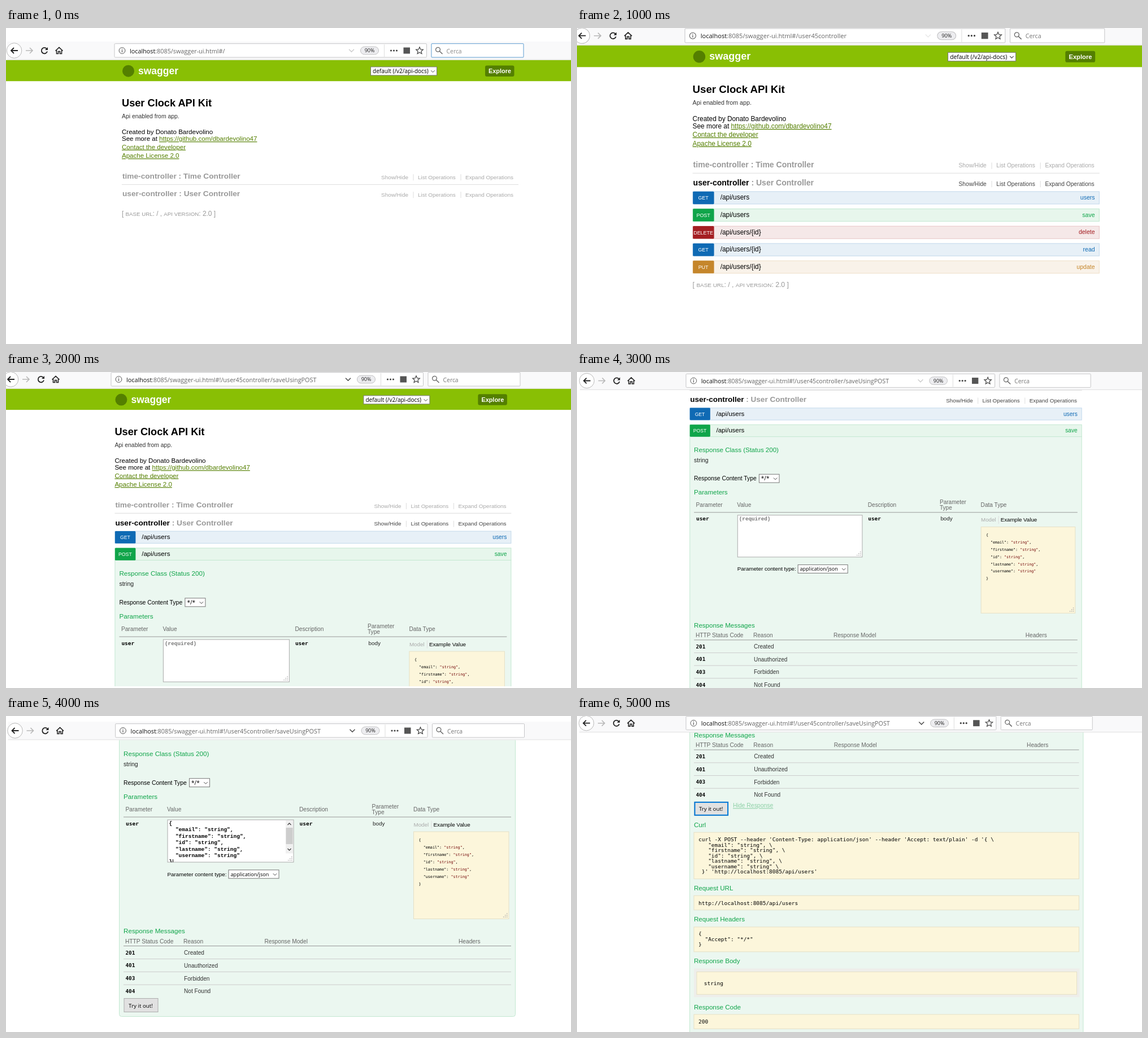
An HTML page for the animation above (6000 ms loop, 1000 px wide and 560 px high).

```html
<!DOCTYPE html>
<html lang="en">
<head>
<meta charset="utf-8">
<title>API docs walkthrough</title>
<style>
html, body { margin: 0; width: 100%; height: 100%; overflow: hidden; background: #fff; }
svg { display: block; }
text { font-family: "Liberation Sans", Arial, sans-serif; white-space: pre; }
.ui { font-family: "Open Sans", "Noto Sans", sans-serif; }
.mono { font-family: "DejaVu Sans Mono", monospace; }
.cour { font-family: "Liberation Mono", monospace; font-weight: bold; }
.b { font-weight: bold; }
.u { text-decoration: underline; }
.end { text-anchor: end; }
.mid { text-anchor: middle; }
</style>
</head>
<body>
<svg id="stage" width="100%" height="100%" viewBox="0 0 1000 560"></svg>
<script>
const GREEN = '#10a54a', GREY = '#999', PALE = '#fcf6db';

// Drawing helpers
const text = (x, y, str, size, fill = '#000', cls = '') =>
  `<text x="${x}" y="${y}" font-size="${size}" fill="${fill}" class="${cls}">${str}</text>`;
const span = (str, attrs) => `<tspan ${attrs}>${str}</tspan>`;
const rect = (x, y, w, h, fill, stroke = 'none', r = 0, sw = 1) =>
  `<rect x="${x}" y="${y}" width="${w}" height="${h}" rx="${r}" fill="${fill}" stroke="${stroke}" stroke-width="${sw}"/>`;
const path = (d, stroke, w = 1, fill = 'none') =>
  `<path d="${d}" stroke="${stroke}" stroke-width="${w}" fill="${fill}"/>`;
const circle = (x, y, r, fill, stroke = 'none', w = 1) =>
  `<circle cx="${x}" cy="${y}" r="${r}" fill="${fill}" stroke="${stroke}" stroke-width="${w}"/>`;
const hline = (y, color, x1 = 8, x2 = 694) => path(`M${x1} ${y}H${x2}`, color);
const chevron = (x, y, r, color, w = 1) => path(`M${x - r} ${y - r / 2}l${r} ${r}l${r} ${-r}`, color, w);
const lines = (x, y, step, list, size, cls, fill) =>
  list.map((s, i) => text(x, y + i * step, s, size, fill, cls)).join('');
const select = (x, y, w, label, size = 10) =>
  rect(x, y, w, 15, '#fff', '#777') + text(x + 3.5, y + 11, label, size, '#000', 'ui') +
  chevron(x + w - 7, y + 8, 3.2, '#444');
const grip = (x, y) => [[0, 0], [-3, 0], [-6, 0], [0, -3], [-3, -3], [0, -6]]
  .map(([dx, dy]) => rect(x + dx, y + dy, 1.4, 1.4, '#aaa')).join('');

const fields = ['email', 'firstname', 'id', 'lastname', 'username'];
const json = (indent, value = '"string"', tail = '') => fields.map((f, i) =>
  `${indent}"${f}": ${value}${i < 4 ? ',' : ''}${tail}`);

// Browser bar: vertical centre is 0
function toolbar({ url, arrow, focus }) {
  const star = Array.from({ length: 10 }, (_, i) => {
    const a = i * Math.PI / 5, r = i % 2 ? 3 : 6.6;
    return `${(732 + r * Math.sin(a)).toFixed(1)} ${(0.3 - r * Math.cos(a)).toFixed(1)}`;
  }).join('L');
  return rect(2, -16, 1010, 32, '#f9f9fa') + hline(16, '#e0e0e0', 2, 1012) +
    circle(14.5, 0, 13.3, '#fff', '#b8b8b8') +
    path('M21 0H9M14 -5L9 0L14 5', '#222', 1.8) +
    path('M35 0H47M42 -5L47 0L42 5', '#b8b8b8', 1.6) +
    path('M72.2 -3A5.2 5.2 0 1 0 73 1.5', '#222', 1.8) + path('M74 -6V-1H69Z', 'none', 0, '#222') +
    path('M87.5 .5L94 -5.6L100.5 .5M89.5 -.5V5.5H92.5V1.5H95.5V5.5H98.5V-.5', '#222', 1.6) +
    rect(192, -12.3, 552.5, 24.3, '#fff', '#c6c6c8', 1.5) +
    circle(205.5, 0, 5.4, 'none', '#555') + path('M205.5 -1V3M205.5 -3.2V-2', '#555', 1.2) +
    text(219, 4.5, span('localhost', 'fill="#111"') + ':8085/swagger-ui.html#' + url, 10.8, '#666', 'ui') +
    chevron(611.5, 0, 4.5, arrow, 1.4) +
    rect(627.5, -6.8, 32, 13.6, '#ededf0', '#c0c0c2', 6.8) +
    text(643.5, 3.4, '90%', 9, '#222', 'ui mid') +
    path('M669.5 -11V11', '#ddd') +
    [681.5, 686.5, 691.5].map(x => circle(x, 0, 1.6, '#444')).join('') +
    rect(703.5, -5.5, 11.5, 11, '#555') +
    path(`M${star}Z`, '#444', 1.2) +
    rect(753, -12.3, 163, 24.3, '#fff', focus ? '#5b9bd0' : '#c6c6c8', 1) +
    circle(764.5, -1.8, 3.9, 'none', '#666', 1.3) + path('M767.5 1.2L772.5 6', '#666', 1.5) +
    text(779.5, 4.5, 'Cerca', 10.4, focus ? '#888' : '#777', 'ui');
}

const section = (y, name, title, open) =>
  text(1, y, span(name, `fill="${open ? '#000' : GREY}"`) + ' : ' + title, 13.68, GREY, 'b') +
  [[459, 'Show/Hide'], [524, 'List Operations'], [608, 'Expand Operations']].map(([x, s]) =>
    text(x, y + .7, s, 9.95, open ? '#444' : '#aaa')).join('') +
  path(`M516 ${y - 8}v11M600 ${y - 8}v11`, '#ddd');

function operation(y, verb, url, note, [main, bg, edge]) {
  return rect(.5, y + .5, 701, 21.5, bg, edge) + rect(.5, y + .3, 36.5, 21.9, main, 'none', 1.5) +
    text(18.5, y + 14.7, verb, 8.7, '#fff', 'mid') + text(47.8, y + 14.7, url, 11.6) +
    text(694, y + 14.4, note, 10.3, main, 'end');
}
const blue = ['#0f6ab4', '#e7f0f7', '#c3d9ec'], green = [GREEN, '#e7f6ec', '#c3e8d1'],
  red = ['#a41e22', '#f5e8e8', '#e8c6c7'], amber = ['#c5862b', '#f9f2e9', '#f0e0ca'];
const operations = [
  ['GET', '/api/users', 'users', blue], ['POST', '/api/users', 'save', green],
  ['DELETE', '/api/users/{id}', 'delete', red], ['GET', '/api/users/{id}', 'read', blue],
  ['PUT', '/api/users/{id}', 'update', amber]
].map((op, i) => operation(252 + i * 29.9, ...op));

function footer(y) {
  const small = s => span(s, 'font-size="9.7"');
  return text(0, y, `[ ${small('BASE URL')}: / , ${small('API VERSION')}: 2.0 ]`, 11.9, GREY);
}

const intro = rect(-300, 0, 1200, 37.5, '#89bf04') +
  circle(11.5, 19.5, 10.5, '#547f00') + text(29, 25, 'swagger', 17.5, '#fff', 'b') +
  select(440.5, 12.2, 117, 'default (/v2/api-docs)') +
  rect(643, 9.7, 51.5, 19.5, '#547f00', 'none', 3) + text(649, 23.5, 'Explore', 10.9, '#fff', 'b') +
  text(0, 82, 'User Clock API Kit', 18.2, '#000', 'b') +
  text(0, 103, 'Api enabled from app.', 10.4, '#333') +
  text(0, 131, 'Created by Donato Bardevolino', 11.56) +
  text(0, 143.5, 'See more at ' + span('https://github.com/dbardevolino47', 'fill="#547f00" class="u"'), 11.56) +
  text(0, 158, 'Contact the developer', 11.56, '#547f00', 'u') +
  text(0, 173.5, 'Apache License 2.0', 11.56, '#547f00', 'u') +
  section(210.5, 'time-controller', 'Time Controller') + hline(220.7, '#ddd', 0, 702);

const label = (y, s) => text(8, y, s, 11.65, GREEN);
const heads = (y, list) => list.map(([x, s, dy = 0]) => text(x, y + dy, s, 10.2, '#666')).join('');

// Body of the opened POST row; "filled" shows the copied example in the text area
function panel(filled, bottom) {
  const area = filled
    ? `<svg x="86" y="444.5" width="223" height="75">` +
      lines(2.5, 9, 11.4, ['{', ...json('  '), '}'], 9.5, 'cour') + path('M9.5 70V75', '#000') +
      rect(209, 1, 13, 58.5, '#f0f0f0') + rect(209.5, 14, 12, 29, '#cdcdcd') +
      path('M212.5 9l3 -3l3 3', '#444', 1.3) + chevron(215.5, 52.5, 3, '#444', 1.3) + '</svg>'
    : text(88.5, 454, '(required)', 9.4, '#777', 'cour');
  const example = ['{', ...json('  ', span('"string"', 'fill="#700000"')), '}'];
  const status = [[201, 'Created'], [401, 'Unauthorized'], [403, 'Forbidden'], [404, 'Not Found']];
  return rect(.5, 300, 701, bottom - 300, '#ebf7f0', '#c3e8d1', 4) +
    label(331.5, 'Response Class (Status 200)') + text(8, 349.5, 'string', 10.5, '#222') +
    text(8, 382.5, 'Response Content Type', 10.45) + select(124.5, 371.2, 36, '*/*') +
    label(407, 'Parameters') +
    heads(429.5, [[11.5, 'Parameter'], [85, 'Value'], [319, 'Description'],
      [447.5, 'Parameter', -5], [447.5, 'Type', 5], [521, 'Data Type']]) +
    hline(439.5, GREY) +
    text(12, 454, 'user', 9.5, '#000', 'mono b') + text(319.5, 454, 'user', 9.5, '#000', 'mono b') +
    text(449, 454, 'body', 9.9, '#222') +
    rect(86, 444.5, 223, 75, '#fff', '#aaa') + area + grip(305, 515.5) +
    text(521.5, 456, 'Model', 9.8, '#aaa') + path('M553 446V460', '#ddd') + text(556.5, 456, 'Example Value', 9.8) +
    rect(521.5, 465.5, 168.5, 154.5, PALE, '#e5e0c6') +
    lines(530.5, 482.5, 12.95, example, 6.75, 'mono') + grip(686, 616) +
    text(85.5, 544.2, 'Parameter content type:', 9.85) + select(194, 533.3, 89, 'application/json', 9.1) +
    label(645.5, 'Response Messages') +
    heads(663, [[11, 'HTTP Status Code'], [114, 'Reason'], [257.5, 'Response Model'], [601, 'Headers']]) +
    hline(668, GREY) +
    status.map(([code, reason], i) => {
      const y = 683 + i * 22.85;
      return text(11.5, y, code, 9.3, '#000', 'mono b') + text(115, y + .3, reason, 10.1, '#333') +
        (i < 3 ? hline(y + 8, '#ccc') : '');
    }).join('') +
    rect(9, 761, 60, 24, '#e1e1e1', '#adadad') + text(17, 777, 'Try it out!', 9.8, '#000', 'ui');
}

function block(title, y, top, h, first, list) {
  return label(y, title) + rect(8, top, 686, h, PALE, '#e5e0c6') +
    lines(16.2, first, 9.55, list, 9.51, 'mono');
}
const response = rect(9.5, 761.5, 59, 23, 'none', '#0078d7', 0, 2) +
  text(77.5, 771, 'Hide Response', 10.5, '#8cd0a5', 'u') +
  block('Curl', 805.6, 815.2, 83, 831.3, [
    "curl -X POST --header 'Content-Type: application/json' --header 'Accept: text/plain' -d '{ \\",
    ...json('   ', '"string"', ' \\'),
    " }' 'http://localhost:8085/api/users'"]) +
  block('Request URL', 919, 928, 25.7, 944.4, ['http://localhost:8085/api/users']) +
  block('Request Headers', 974.3, 984, 44.2, 999.7, ['{', '  "Accept": "*/*"', '}']) +
  label(1048.8, 'Response Body') + rect(8, 1058, 687, 51.3, '#eeeeea') +
  rect(13, 1064, 677, 40.2, PALE, '#e5e0c6') + text(26, 1087.6, 'string', 9.51, '#000', 'mono') +
  block('Response Code', 1131, 1140, 25.6, 1156.4, ['200']);

const closed = intro + section(241.5, 'user-controller', 'User Controller') + footer(276);
const opened = intro + section(242, 'user-controller', 'User Controller', true);
const expanded = opened + operations[0] + panel(false, 793) + operations[1];
const post = '!/user45controller/saveUsingPOST', dark = '#444', light = '#ccc';

// s: zoom, bx/by: bar offset, px/py: page offset
const scenes = [
  { s: 1, bx: 0, by: 40, px: 205, py: 56.7, url: '/', arrow: light, focus: true, page: closed },
  { s: 1.026, bx: -6, by: 13.7, px: 204.6, py: 30.8, url: '/user45controller', arrow: '#e8e8e8',
    page: opened + operations.join('') + footer(417.8) },
  { s: 1, bx: -6, by: 13, px: 192.4, py: 29.6, url: post, arrow: dark, end: 557, page: expanded },
  { s: .9893, bx: 3, by: 15.5, px: 199.2, py: -186, url: post, arrow: light, page: expanded },
  { s: 1, bx: 1.5, by: 26, px: 200, py: -260.5, url: post, arrow: dark, page: panel(true, 793) },
  { s: .9935, bx: 2.2, by: 12.7, px: 199, py: -603.7, url: post, arrow: dark,
    page: panel(true, 1300) + response }
];

const stage = document.getElementById('stage');
stage.innerHTML = scenes.map(c => `<g display="none">
  <g transform="translate(${c.px} ${c.py}) scale(${c.s})">${c.page}</g>
  ${rect(0, 0, 1000, c.by + 16.5 * c.s, '#fff')}
  ${c.end ? rect(0, c.end, 1000, 560 - c.end, '#fff') : ''}
  <g transform="translate(${c.bx} ${c.by}) scale(${c.s})">${toolbar(c)}</g></g>`).join('');

const groups = [...stage.children];
const start = performance.now();
function draw(now) {
  const current = Math.floor(Math.max(0, now - start) / 1000) % scenes.length;
  groups.forEach((g, i) => g.setAttribute('display', i === current ? 'inline' : 'none'));
  requestAnimationFrame(draw);
}
draw(start);
</script>
</body>
</html>
```
